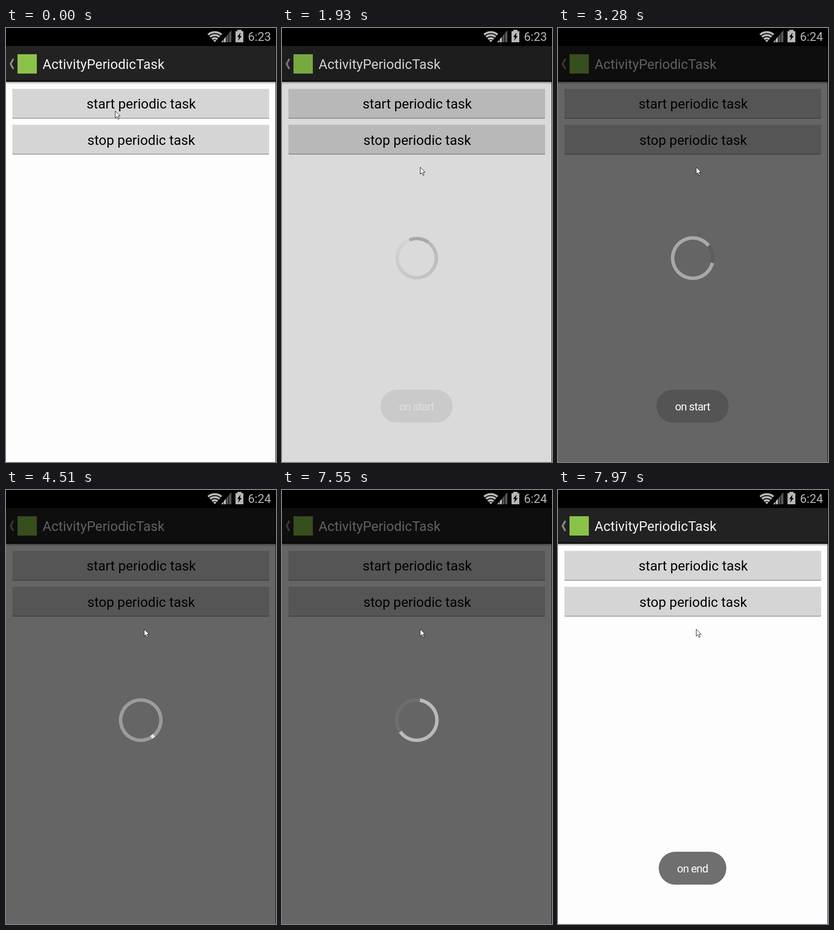
An HTML page that plays this animation: 587 by 943 pixels, repeating every 8 s.

```html
<!DOCTYPE html>
<html lang="en">
<head>
<meta charset="utf-8">
<title>Periodic task</title>
<style>
html, body { margin: 0; width: 100%; height: 100%; overflow: hidden; background: #fdfdfd; }
svg { position: absolute; left: 0; top: 0; width: 587px; height: 943px; font-family: Roboto, sans-serif; }
#ring {
  position: absolute; left: 245px; top: 452px; width: 96px; height: 96px; border-radius: 50%;
  -webkit-mask: radial-gradient(closest-side, transparent 82.5%, #000 84% 98.5%, transparent 100%);
  mask: radial-gradient(closest-side, transparent 82.5%, #000 84% 98.5%, transparent 100%);
}
.label { font-size: 29.5px; text-anchor: middle; }
#toast text { font-size: 24px; letter-spacing: -.85px; text-anchor: middle; fill: #fff; }
</style>
</head>
<body>
<svg viewBox="0 0 587 943">
  <defs>
    <linearGradient id="shade" x2="0" y2="1">
      <stop stop-color="#a8a8a8"/><stop offset="1" stop-color="#fdfdfd"/>
    </linearGradient>
    <g id="button">
      <rect x="14" width="558" height="65" rx="2" fill="#8e8e8e"/>
      <rect x="14" width="558" height="63.5" rx="2" fill="#d5d5d5"/>
      <path d="M15 .5H571" stroke="#e2e2e2"/>
    </g>
  </defs>
  <rect width="587" height="943" fill="#fdfdfd"/>

  <!-- action bar -->
  <rect y="39" width="587" height="78" fill="#222"/>
  <rect y="113" width="587" height="4" fill="#141414"/>
  <rect y="117" width="587" height="5" fill="url(#shade)"/>
  <path d="M16 67 10 78 16 89" fill="none" stroke="#8a8a8a" stroke-width="4"/>
  <rect x="25" y="57" width="42" height="42" fill="#8bc34a"/>
  <text x="79.5" y="89" font-size="29.4" fill="#f3f3f3">ActivityPeriodicTask</text>

  <use href="#button" y="132"/>
  <text class="label" x="294" y="175">start periodic task</text>
  <use href="#button" y="210"/>
  <text class="label" x="294" y="253.5">stop periodic task</text>

  <rect id="dim" y="39" width="587" height="904"/>

  <!-- status bar -->
  <rect width="587" height="39"/>
  <path id="wifi" fill="none" stroke="#b8b8b8" stroke-width="4.6"/>
  <path d="M468 31H490V5Z" fill="#555"/>
  <path d="M468 31H478V19Z" fill="#c4c4c4"/>
  <path d="M473 20V31M478.5 12V31M484 5V31" stroke="#000" stroke-width="1.2"/>
  <path d="M503 4H512V7H516V31H499V7H503Z" fill="#b8b8b8"/>
  <path d="M510 10 502.5 19.5H506.500L504.500 27.500 512.500 17.500H508.500Z"/>
  <text id="clock" x="526" y="28" font-size="26" fill="#b8b8b8"></text>

  <path d="M586.5 0V943" stroke="#000"/>
</svg>
<div id="ring"></div>
<svg viewBox="0 0 587 943">
  <g id="toast">
    <rect y="786" height="71.500" rx="35.700" fill="#515151" fill-opacity=".82"/>
    <text x="292.500" y="831"></text>
  </g>
  <path id="cursor" d="M.5 .5V15.500L4 12.300 6.500 18.200 9 17.200 6.500 11.400H11.200Z" fill="#fff" stroke="#15152a"/>
</svg>
<script>
const $ = id => document.getElementById(id);
const LOOP = 8000;
const clamp = v => Math.max(0, Math.min(1, v));
const mod = (a, n) => (a % n + n) % n;

// Screen refreshes come in bursts: start and last step of each
const bursts = [[1930, 2890], [3010, 3940], [4090, 5080], [5200, 6180], [6300, 7310], [7430, 7970]];
// Screen time against spinner time
const spin = [[1930, -140], [2067, 0], [4514, 2530], [6180, 4140], [7565, 5610], [7970, 6010]];
// text, pill width, fade-in start and length, fade-out start and length
const toasts = [
  ['on start', 157, 1893, 270, 3600, 330],
  ['fail to once valid call', 281, 4560, 280, 6820, 330],
  ['on end', 147, 7600, 230, 9000, 1]
];

function refreshTime(t) {
  const burst = bursts.filter(b => b[0] <= t).pop();
  if (!burst) return 0;
  const [start, end] = burst;
  const count = Math.round((end - start) / 138);
  const step = (end - start) / count;
  return start + step * Math.min(count, Math.floor((t - start + 18) / step));
}

function interpolate(points, t) {
  let i = 1;
  while (i < points.length - 1 && t > points[i][0]) i++;
  const [x0, y0] = points[i - 1], [x1, y1] = points[i];
  return y0 + (y1 - y0) * (t - x0) / (x1 - x0);
}

const fade = (t, start, length, outStart, outLength) =>
  clamp((t - start) / length) * (1 - clamp((t - outStart) / outLength));

const gray = v => `rgb(${v},${v},${v})`;

function drawRing(t) {
  const alpha = fade(t, 1870, 150, 7590, 150);
  const phase = interpolate(spin, t);
  const back = 309 - 720 / 3500 * phase;
  const front = 78 + 1080 / 3500 * phase;
  const gap = mod(front - back, 360);
  // Two opposed gradients add up to two flat levels
  const low = 82 + 75 * gap / 360, high = low + 75;
  const slope = 60 * (1 - alpha);
  const edge = 360 - gap;
  $('ring').style.opacity = alpha;
  $('ring').style.transform = `scale(${0.95 + 0.05 * alpha})`;
  $('ring').style.background = `conic-gradient(from ${mod(front, 360)}deg, ` +
    `${gray(high - slope)}, ${gray(high + slope)} ${edge}deg, ${gray(low)} ${edge}deg)`;
}

function drawToast(t) {
  const [text, width, ...times] = toasts.filter(n => n[2] <= t).pop() || toasts[0];
  const [pill, label] = $('toast').children;
  $('toast').setAttribute('opacity', fade(t, ...times));
  pill.setAttribute('x', 292.5 - width / 2);
  pill.setAttribute('width', width);
  label.textContent = text;
}

function drawCursor(t) {
  const p = clamp(Math.floor((t - 120) / 135 + 1) / 5);
  const e = p * p * (3 - 2 * p);
  $('cursor').setAttribute('transform', `translate(${Math.round(237 + 63 * e)} ${Math.round(180 + 122 * e)})`);
}

function draw(now) {
  const t = now % LOOP, shown = refreshTime(t);
  $('dim').setAttribute('opacity', 0.6 * fade(shown, 1884, 201, 7590, 240));
  $('clock').textContent = shown < 2450 ? '6:23' : '6:24';
  drawRing(shown);
  drawToast(shown);
  drawCursor(t);
}

$('wifi').setAttribute('d', [3, 9, 15.5, 22].map(r =>
  `M${454 - 0.66 * r} ${31 - 0.75 * r}A${r} ${r} 0 0 1 ${454 + 0.66 * r} ${31 - 0.75 * r}`).join(''));

let begin;
function tick(now) {
  begin ??= now;
  draw(now - begin);
  requestAnimationFrame(tick);
}
draw(0);
requestAnimationFrame(tick);
</script>
</body>
</html>
```
